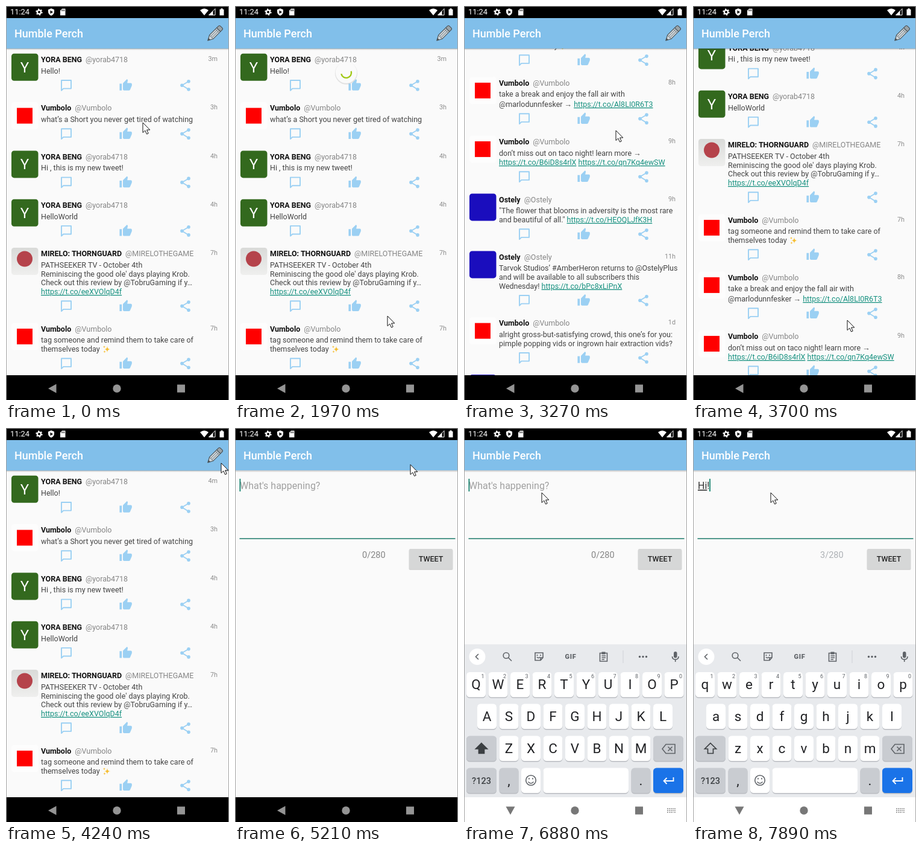
Animation, 370 px wide and 652 px high, one loop 8 s. Source, as an HTML page:

```html
<!DOCTYPE html>
<html lang="en">
<head>
<meta charset="utf-8">
<title>Humble Perch</title>
<style>
html, body { margin: 0; width: 100%; height: 100%; overflow: hidden; background: #fafafa; }
svg { display: block; width: 370px; height: 652px; font-family: Roboto, "Noto Sans", sans-serif; }
text { white-space: pre; }
.row { font-size: 12.5px; fill: #444; }
.name { font-weight: 700; fill: #111; }
.handle { fill: #858585; }
.age { font-size: 10.8px; fill: #8c8c8c; text-anchor: end; }
.link { fill: #15907f; text-decoration: underline; }
.mid { text-anchor: middle; }
.key { font-size: 22.5px; fill: #202124; text-anchor: middle; }
.num { font-size: 9px; fill: #5f6368; text-anchor: middle; }
.tip { font-size: 14.5px; fill: #3c4043; text-anchor: middle; }
.line { fill: none; stroke: #5f6368; stroke-width: 1.6; }
</style>
</head>
<body>
<svg viewBox="0 0 370 652" xmlns="http://www.w3.org/2000/svg">
  <defs>
    <clipPath id="body"><rect x="0" y="70" width="370" height="541"/></clipPath>
    <clipPath id="screen"><rect x="0" y="20" width="370" height="591"/></clipPath>
    <linearGradient id="shade" x2="0" y2="1">
      <stop stop-color="#000" stop-opacity=".22"/><stop offset="1" stop-color="#000" stop-opacity="0"/>
    </linearGradient>
    <linearGradient id="mist" x2="0" y2="1">
      <stop stop-color="#d9dad8"/><stop offset="1" stop-color="#efefee"/>
    </linearGradient>
    <g id="actions" fill="#9bd0f3">
      <path d="M92 -8.3H108V5.3H95.2L92 8.5Z" fill="none" stroke="#9bd0f3" stroke-width="1.9" stroke-linejoin="round"/>
      <path transform="translate(187.5 -11.2) scale(.93)" d="M1 21h4V9H1zM23 10c0-1.1-.9-2-2-2h-6.3l1-4.9c0-.4-.2-.8-.4-1L14.2 1 7.6 7.6C7.2 8 7 8.5 7 9v10c0 1.1.9 2 2 2h9c.8 0 1.5-.5 1.8-1.2l3-7c.1-.3.2-.5.2-.8z"/>
      <path d="M303 -6.5L292 0L303 6.7" fill="none" stroke="#9bd0f3" stroke-width="1.8"/>
      <circle cx="303" cy="-6.5" r="2.8"/><circle cx="292" cy="0" r="2.8"/><circle cx="303" cy="6.7" r="2.8"/>
    </g>
  </defs>

  <rect width="370" height="652" fill="#fafafa"/>
  <g clip-path="url(#body)">
    <g id="feed"></g>
    <g id="spinner">
      <circle cy="1.2" r="18.6" fill="#000" opacity=".1"/>
      <circle r="17.8" fill="#fafafa"/>
      <path id="arc" d="M8.2 -2.2A8.5 8.5 0 1 1 -8.2 2.2" fill="none" stroke="#a0c814" stroke-width="2.4"/>
    </g>
  </g>
  <rect y="20" width="370" height="50.5" fill="#81bfea"/>
  <text x="14" y="52" font-size="18" font-weight="500" fill="#fff">Humble Perch</text>
  <g id="pencil">
    <g transform="translate(335 57) rotate(-45)" stroke="#4a5358" stroke-width="1.1" stroke-linejoin="round">
      <path d="M0 0L8 -4.4H25V4.4H8Z" fill="#cfd6da"/>
      <path d="M25 -4.4H29Q31.5 -4.4 31.5 -2V2Q31.5 4.4 29 4.4H25Z" fill="#9aa4a9"/>
      <path d="M8 -1.5H25M8 1.5H25M8 -4.4V4.4M22 -4.4V4.4" fill="none" stroke-width=".7"/>
      <path d="M0 0L3 -1.6V1.6Z" fill="#4a5358"/>
    </g>
  </g>

  <g clip-path="url(#screen)">
    <g id="compose">
      <rect y="70" width="370" height="545" fill="#fafafa"/>
      <text id="hint" x="8" y="101" font-size="16" fill="#a0a0a0">What's happening?</text>
      <text id="typed" x="8" y="101" font-size="16" fill="#333"><tspan id="word" text-decoration="underline"></tspan><tspan id="mark"></tspan></text>
      <rect id="caret" y="84" width="1.8" height="21" fill="#16836f"/>
      <rect x="7.5" y="182.3" width="358" height="1.6" fill="#2a8273"/>
      <text id="count" x="211" y="215" font-size="14.5"></text>
      <rect x="288.5" y="201" width="73" height="34" rx="2" fill="#000" opacity=".15"/>
      <rect x="289" y="200" width="72" height="33" rx="2" fill="#d6d7d7"/>
      <text class="mid" x="325" y="221.2" font-size="12.5" font-weight="500" fill="#222">TWEET</text>
    </g>
    <rect y="70" width="370" height="3.5" fill="url(#shade)"/>
    <g id="keyboard"></g>
  </g>

  <rect width="370" height="20" fill="#000"/>
  <g fill="#fff">
    <text x="7" y="14.4" font-size="12.8">11:24</text>
    <circle cx="55" cy="10" r="3.1" fill="none" stroke="#fff" stroke-width="2.4"/>
    <circle cx="55" cy="10" r="4.9" fill="none" stroke="#fff" stroke-width="1.6" stroke-dasharray="2.2 2.93"/>
    <path d="M75 4L80 6V10Q79.5 14 75 16Q70.5 14 70 10V6Z"/>
    <path d="M73.5 7.2L78 10L73.5 12.8Z" fill="#000"/>
    <path d="M93 4.5H98.5V15.5H90V7.5Z"/>
    <path d="M92.7 6V8.5M94.7 6V8.5M96.7 6V8.5" stroke="#000" stroke-width=".9"/>
    <path d="M322 7Q329 1.5 336 7L329 15.5Z"/>
    <path d="M347 4.5V15H336.5Z" fill="none" stroke="#fff"/><path d="M343.5 8V15H336.5Z"/>
    <path d="M354.5 5.5H356.5V4H359.5V5.5H361.5V15.5H354.5Z"/>
  </g>

  <rect id="nav" y="611" width="370" height="41"/>
  <g id="buttons">
    <path id="back" d="M-7 0L6.5 -7.5V7.5Z"/>
    <circle cx="184" cy="633" r="6.7"/>
    <rect x="284" y="626.5" width="13" height="13"/>
    <path id="dots" d="M337 630H351M337 633H351M337 636H339M340.5 636H347.5M349 636H351" fill="none" stroke-width="1.7" stroke-dasharray="1.7 1.3"/>
  </g>
  <path d="M.5 652V.5H369.5V652" fill="none" stroke="#a3a3a3"/>
  <path id="pointer" d="M0 0V16.5L3.8 13L6.5 19L9.2 17.8L6.6 12H11.8Z" fill="#fff" stroke="#111" stroke-linejoin="round"/>
</svg>

<script>
(() => {
const LOOP = 8000;
const $ = id => document.getElementById(id);
const show = (id, on) => $(id).setAttribute('display', on ? 'inline' : 'none');
const move = (id, x, y) => $(id).setAttribute('transform', `translate(${x} ${y})`);

// The screen refreshes in bursts: [first change, last change, steps]
const bursts = [[280, 1210, 8], [1360, 1600, 3], [1970, 2120, 2], [2420, 3420, 8], [3570, 4510, 8],
  [4790, 5750, 8], [5880, 6480, 5], [6880, 7030, 2], [7310, 7310, 1], [7740, 7890, 2]];
const ticks = [0];
for (const [from, to, n] of bursts)
  for (let i = 0; i < n; i++)
    ticks.push(Math.floor((from + (to - from) * i / Math.max(1, n - 1)) / 10) * 10);
const snap = t => ticks.filter(k => k <= t).pop();

function track(keys, t) {
  const i = keys.findIndex(k => k[0] > t);
  if (i < 0) return keys[keys.length - 1].slice(1);
  if (i === 0) return keys[0].slice(1);
  const a = keys[i - 1], b = keys[i], p = (t - a[0]) / (b[0] - a[0]);
  return a.slice(1).map((v, j) => v + (b[j + 1] - v) * p);
}

const pointerPath = [[0, 227, 193], [280, 228, 197], [540, 235, 265], [950, 250, 480], [1210, 252, 525],
  [1360, 253, 516], [1600, 253, 513], [1970, 253, 513], [2120, 240, 300], [2420, 238, 250], [2700, 237, 177],
  [2840, 237, 150], [3130, 246, 175], [3270, 252, 206], [3420, 253, 206], [3570, 253, 330], [3700, 256, 520],
  [3830, 262, 620], [3970, 300, 420], [4100, 338, 160], [4240, 357, 58], [4510, 346, 45], [5060, 346, 45],
  [5330, 240, 75], [5600, 140, 104], [5750, 129, 107]];
const scrollPath = [[2120, 0], [2420, 6], [2560, 25], [2700, 71.5], [2840, 190], [2990, 340], [3130, 450],
  [3270, 502], [3420, 508], [3570, 385], [3700, 180], [3830, 30], [3970, 0]];
const spinnerPath = [[280, 50], [410, 62], [680, 100], [950, 128], [1070, 126], [1210, 110]];
const keyboardPath = [[6030, 253], [6180, 140], [6330, 22], [6480, 0]];

// Feed
const yora = ['YORA BENG', '@yorab4718', 'letter'];
const vumbolo = ['Vumbolo', '@Vumbolo', 'red'];
const mirelo = ['MIRELO: THORNGUARD', '@MIRELOTHEGAME', 'mist'];
const ostely = ['Ostely', '@Ostely', 'blue'];
const posts = [
  [yora, '3m', ['Hello!']],
  [vumbolo, '3h', ['what’s a Short you never get tired of watching']],
  [yora, '4h', ['Hi , this is my new tweet!']],
  [yora, '4h', ['HelloWorld']],
  [mirelo, '7h', ['PATHSEEKER TV - October 4th', "Reminiscing the good ole' days playing Krob.",
    'Check out this review by @TobruGaming if y…', 'https://t.co/eeXVOlqD4f']],
  [vumbolo, '7h', ['tag someone and remind them to take care of', 'themselves today ✨']],
  [vumbolo, '8h', ['take a break and enjoy the fall air with', '@marlodunnfesker → https://t.co/Al8LI0R6T3']],
  [vumbolo, '9h', ['don’t miss out on taco night! learn more →', 'https://t.co/B6iD8s4rlX https://t.co/qn7Kq4ewSW']],
  [ostely, '9h', ['"The flower that blooms in adversity is the most rare', 'and beautiful of all." https://t.co/HEOQLJfK3H']],
  [ostely, '11h', ['Tarvok Studios’ #AmberHeron returns to @OstelyPlus', 'and will be available to all subscribers this',
    'Wednesday! https://t.co/bPc8xLiPnX']],
  [vumbolo, '1d', ['alright gross-but-satisfying crowd, this one’s for you:', 'pimple popping vids or ingrown hair extraction vids?']],
  [ostely, '1d', ['']]
];
const tile = fill => `<rect x="9" y="-9.5" width="44.5" height="45" rx="4.5" fill="${fill}"/>`;
const avatars = {
  letter: tile('#33691e') + '<text class="mid" x="31" y="21.5" font-size="24" fill="#fff">Y</text>',
  red: tile('#fdfdfd') + '<rect x="18" y="0" width="26" height="26" fill="#f00"/>',
  mist: tile('url(#mist)') + '<circle cx="31" cy="9" r="13" fill="#b5434b"/>',
  blue: tile('#1a0dbd')
};
const star = (x, y, r) =>
  `<path fill="#f6bf35" d="M${x} ${y - r}Q${x} ${y} ${x + r} ${y}Q${x} ${y} ${x} ${y + r}Q${x} ${y} ${x - r} ${y}Q${x} ${y} ${x} ${y - r}"/>`;
const linkify = s => s.replace(/https:\S+/g, '<tspan class="link">$&</tspan>');

let rowY = 88.3;
$('feed').innerHTML = posts.map(([[name, handle, kind], age, lines]) => {
  let y = 23.4, extra = '', body = '';
  lines.forEach((line, i) => {
    if (line.includes('→')) y += i + 1; // the arrow's fallback font makes a taller line
    if (line.includes('✨')) extra = star(168, y - 4, 5.5) + star(163, y - 8, 2.5) + star(163.5, y, 2.5);
    body += `<text x="58" y="${y}">${linkify(line.replace('✨', ''))}</text>`;
    y += 14.7;
  });
  const row = `<g class="row" transform="translate(0 ${rowY})">${avatars[kind]}
    <text x="58" y="4.6"><tspan class="name">${name}</tspan><tspan class="handle" dx="6">${handle}</tspan></text>
    <text class="age" x="351" y="2.7">${age}</text>${body}${extra}
    <use href="#actions" y="${y + 4.9}"/></g>`;
  rowY += y + 42.2;
  return row;
}).join('');
const firstAge = document.querySelector('.age');

// Keyboard
const cap = (x, y, w, fill = '#fff') =>
  `<rect x="${x}" y="${y + 1}" width="${w}" height="42" rx="5.5" fill="#b9bcc1"/><rect x="${x}" y="${y}" width="${w}" height="41.5" rx="5.5" fill="${fill}"/>`;
const letters = (chars, x, y) => [...chars].map((c, i) =>
  cap(x + 36.5 * i, y, 32) + `<text class="key letter" x="${x + 16 + 36.5 * i}" y="${y + 28}">${c}</text>`).join('');
const grey = '#c9ccd1';
$('keyboard').innerHTML = `
  <rect y="358" width="370" height="254" fill="#e8eaed"/>
  <circle cx="22" cy="378.5" r="13.5" fill="#fff"/>
  <path class="line" d="M24 374L19.5 378.5L24 383"/>
  <g id="tools">
    <circle class="line" cx="70" cy="376.5" r="4.8"/><path class="line" d="M73.5 380L79 385.5"/>
    <path class="line" d="M118 372H131V380L127 384.5H118ZM127 384.5V380H131M121 379Q123.5 382 126 379M121.5 375V377M127 375V377"/>
    <text class="mid" x="177" y="382" font-size="11" font-weight="900" fill="#5f6368" letter-spacing=".8">GIF</text>
    <path class="line" d="M225.5 372.5H237.5V386H225.5ZM228.5 377H235M228.5 380H235M228.5 383H233"/>
    <rect x="228.5" y="370.5" width="6" height="4" fill="#5f6368"/>
    <path d="M264 368V389" stroke="#cfd2d6"/>
    <path d="M291.5 378.5H303" stroke="#5f6368" stroke-width="3.5" stroke-linecap="round" stroke-dasharray="0 5.5"/>
  </g>
  <g id="tips">
    <path d="M138 368V389M231 368V389" stroke="#cfd2d6"/>
    ${[91, 184, 278].map(x => `<text class="tip" x="${x}" y="383.5"></text>`).join('')}
  </g>
  <rect x="348" y="370" width="5.5" height="10.5" rx="2.7" fill="#5f6368"/>
  <path class="line" d="M345.5 378Q345.5 383 350.7 383Q356 383 356 378M350.7 383V387"/>
  ${letters('qwertyuiop', 4, 404)}
  ${[...'1234567890'].map((n, i) => `<text class="num" x="${31 + 36.5 * i}" y="414">${n}</text>`).join('')}
  ${letters('asdfghjkl', 22, 456.5)}
  ${cap(4, 509.5, 50, grey)}${letters('zxcvbnm', 58.5, 509.5)}${cap(314, 509.5, 50, grey)}
  <path id="shift" d="M29 521.5L38.5 531H33.5V538.5H24.5V531H19.5Z" stroke="#3c4043" stroke-width="1.7"/>
  <path class="line" d="M329 531L335 523.5H350V538.5H335ZM338.5 527.5L345.5 534.5M345.5 527.5L338.5 534.5"/>
  ${cap(4, 562.5, 50, grey)}<text class="mid" x="29" y="588.5" font-size="14.5" font-weight="500" fill="#3c4043">?123</text>
  ${cap(58.5, 562.5, 32, grey)}<text class="key" x="74.5" y="591">,</text>
  ${cap(95, 562.5, 32)}
  <circle class="line" cx="111" cy="583" r="8.3"/><path class="line" d="M106.5 585.5Q111 590.5 115.5 585.5M108 579V581.5M114 579V581.5"/>
  ${cap(131.5, 562.5, 141.5)}
  ${cap(277.5, 562.5, 32, grey)}<text class="key" x="293.5" y="591">.</text>
  ${cap(314, 562.5, 50, '#1a73e8')}
  <path d="M347.5 578V584H332M336.5 579L331.5 584L336.5 589" fill="none" stroke="#fff" stroke-width="1.8"/>`;
const letterKeys = [...document.querySelectorAll('.letter')];
const tipTexts = [...document.querySelectorAll('.tip')];

function render(now) {
  const t = snap(now % LOOP);
  move('pointer', ...track(pointerPath, t));
  move('feed', 0, -track(scrollPath, t)[0]);
  firstAge.textContent = t < 3420 ? '3m' : '4m';

  show('spinner', t >= 280 && t < 2120);
  move('spinner', 184.5, track(spinnerPath, t)[0]);
  $('arc').setAttribute('transform', `rotate(${(t - 1970) * .5})`);

  const composing = t >= 4790, opening = composing && t < 4920;
  show('compose', composing);
  show('pencil', !composing);
  $('compose').setAttribute('opacity', opening ? .6 : 1);
  move('compose', 0, opening ? 22 : 0);

  const word = t < 7030 ? '' : t < 7310 ? 'H' : 'Hi', mark = t < 7890 ? '' : '!';
  $('word').textContent = word;
  $('mark').textContent = mark;
  show('hint', !word);
  const size = word.length + mark.length;
  $('count').textContent = `${size}/280`;
  $('count').setAttribute('fill', size ? '#adb1b5' : '#858585');
  $('caret').setAttribute('x', size ? 7.7 + $('typed').getComputedTextLength() : 7.5);

  const keyed = t >= 6180, shifted = (t >= 6880 && t < 7030) || (t >= 7740 && t < 7890);
  show('keyboard', keyed);
  move('keyboard', 0, track(keyboardPath, t)[0]);
  for (const k of letterKeys)
    k.textContent = shifted ? k.textContent.toUpperCase() : k.textContent.toLowerCase();
  $('shift').setAttribute('fill', shifted ? '#3c4043' : 'none');
  const suggesting = t >= 7030 && t < 7890;
  show('tools', !suggesting);
  show('tips', suggesting);
  const tips = word === 'H' ? ['He', 'H', 'How'] : ['His', 'Hi', 'Him'];
  tipTexts.forEach((el, i) => el.textContent = tips[i]);

  $('nav').setAttribute('fill', keyed ? '#fff' : '#000');
  $('buttons').setAttribute('fill', keyed ? '#777' : '#949494');
  $('dots').setAttribute('stroke', keyed ? '#777' : '#949494');
  $('back').setAttribute('transform', `translate(77 633) rotate(${keyed ? -90 : 0})`);
  show('dots', t >= 5880);
}

const start = performance.now();
function frame() {
  render(performance.now() - start);
  requestAnimationFrame(frame);
}
frame();
})();
</script>
</body>
</html>
```
